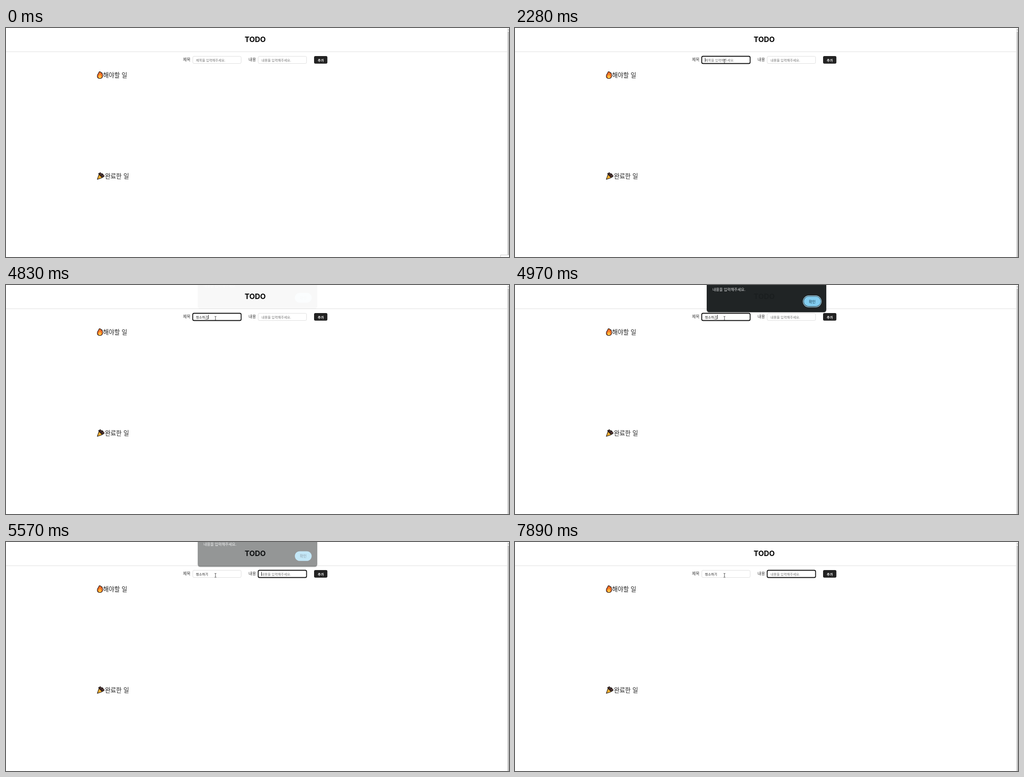
Write an HTML page that moves like this. It is 1107 px wide and 506 px high and loops after 8000 ms.

```html
<!DOCTYPE html>
<html lang="ko">
<head>
<meta charset="utf-8">
<title>TODO</title>
<style>
  html, body { margin: 0; width: 100%; height: 100%; overflow: hidden; background: #fff; }
  svg { display: block; width: 100%; height: 100%; }
  text { font-family: "Noto Sans CJK KR", "Noto Sans CJK", "Noto Sans CJK JP", sans-serif; fill: #222; white-space: pre; }
  .logo { font: 700 16px Inter, sans-serif; fill: #000; text-anchor: middle; }
  .heading { font-size: 13.4px; }
  .label { font-size: 8.9px; fill: #333; }
  .field { font-size: 7.35px; }
  .hint { fill: #757575; }
  .button { font-size: 7.35px; font-weight: 700; fill: #fff; }
  .dialog { font-size: 8.2px; fill: #e3e5e6; }
  .box { fill: #fff; stroke: #ddd; stroke-width: 1; }
  .box.focused { stroke: #0b0b0b; stroke-width: 1.8; }
</style>
</head>
<body>
<svg viewBox="0 0 1107 506">
  <text class="logo" x="548.5" y="31">TODO</text>
  <path d="M0 52.5H1103" stroke="#dedede"/>

  <text class="label" x="389.6" y="73.4">제목</text>
  <rect class="box" id="titleBox" x="411" y="62.5" width="106.5" height="16" rx="3"/>
  <text class="field hint" id="titleHint" x="418" y="73.5">제목을 입력해주세요.</text>
  <text class="field" id="titleText" x="418" y="73.5"></text>
  <path id="underline" stroke="#333" stroke-width=".8"/>

  <text class="label" x="533.8" y="73.4">내용</text>
  <rect class="box" id="bodyBox" x="555" y="62.5" width="106.5" height="16" rx="3"/>
  <text class="field hint" x="562.3" y="73.5">내용을 입력해주세요.</text>
  <path id="caret" stroke="#222" stroke-width="1"/>

  <rect x="678" y="62" width="29.3" height="16.7" rx="3" fill="#222"/>
  <text class="button" x="685.9" y="73.5">추가</text>

  <!-- flame -->
  <g stroke-linejoin="round">
    <path d="M205 96.8C207 96 209.2 97.5 209.8 99.5L211 98.8C212.6 101.5 213 104 212.7 106.5C212.2 110 210 111.6 206.8 111.6C203.2 111.6 200.9 109.4 200.9 106C200.9 103.5 202 102.4 203.1 100.8C204 99.4 204.4 98.2 205 96.8Z" fill="#f4722b" stroke="#1a1210" stroke-width="1.2"/>
    <path d="M206.4 102.5C207.8 104 210.2 105.6 210 108C209.8 110 208.5 110.9 206.7 110.9C204.7 110.9 203.3 109.7 203.3 107.9C203.3 106.2 204.4 105.9 205 104.9Z" fill="#fdb62f"/>
    <path d="M206.6 106.6Q208.4 110.4 206.6 110.6Q204.7 110.4 206.6 106.6Z" fill="#ffe37a"/>
  </g>
  <text class="heading" x="213.7" y="109">해야할 일</text>

  <!-- party popper -->
  <g stroke="#17120f" stroke-linejoin="round">
    <path d="M203.5 321.5L208 319.4L210.5 322L213 322L214 324.5L216.3 326.5L215 329L211.5 330L205 324.5Z" fill="#3b2a2b" stroke-width="1"/>
    <path d="M204.6 323.6L212 330.8L201 334.5Z" fill="#fbb733" stroke-width="1.2"/>
    <path d="M203.5 328.3L206.5 332M205 325L210 330.4" stroke="#e78a20" stroke-width=".7"/>
    <path d="M207.5 321.4l1.2 1.1M212 326.5l2.3.4" stroke="#a85c49" stroke-width="1"/>
  </g>
  <text class="heading" x="217.7" y="332">완료한 일</text>

  <rect x="1103" width="4" height="506" fill="#f1f1f1"/>
  <path d="M1104 5L1105.5 3L1107 5Z" fill="#888"/>
  <rect x="1104" y="8" width="3" height="498" fill="#c1c1c1"/>
  <rect id="corner" x="1088.5" y="501.5" width="20" height="6" fill="#fff" stroke="#c8c8c8"/>

  <g id="dialog">
    <rect x="421.5" y="-30" width="264" height="92.3" rx="6" fill="#000" opacity=".22"/>
    <rect x="422" y="-30" width="263" height="91" rx="5.5" fill="#1b1f20"/>
    <text class="dialog" x="434.7" y="14.2">내용을 입력해주세요.</text>
    <rect id="ring" x="634.2" y="25" width="39.8" height="24.6" rx="12.3" fill="none" stroke="#a6dcf5" stroke-width="1.3"/>
    <rect x="635.7" y="26.6" width="37" height="21.4" rx="10.7" fill="#80ccf0"/>
    <text x="646.4" y="40.5" font-size="8.2" style="fill:#12384a">확인</text>
  </g>

  <g id="pointer">
    <path id="arrow" d="M0 0V11L2.5 8.7L4.2 12.4L5.8 11.7L4.2 8H7.7Z" fill="#fff" stroke="#000" stroke-width=".7"/>
    <path id="beam" d="M-2 -4.3H-.6L0 -3.7L.6 -4.3H2M0 -3.7V3.7M-2 4.3H-.6L0 3.7L.6 4.3H2" fill="none" stroke="#333" stroke-width=".9"/>
  </g>
</svg>
<script>
const LOOP = 8000, STEP = 68;
const FOCUS_TITLE = 1220, FOCUS_BODY = 5510;
const $ = id => document.getElementById(id);

// time, text in the title field, length of the part still being composed
const typing = [
  [0, '', 0], [2740, 'c', 0], [3410, '', 0],
  [3680, 'ㅊ', 1], [3750, '처', 1], [3820, '청', 1],
  [4070, '청ㅅ', 1], [4140, '청소', 1],
  [4290, '청솧', 1], [4360, '청소하', 1], [4430, '청소학', 1], [4500, '청소하기', 1],
  [FOCUS_BODY, '청소하기', 0]
];

// times at which the caret turns on or off
const caretFlips = [FOCUS_TITLE, 1750, 2280, 3140, 3410, 6040, 6500, 6900, 7360, 7890];

// time, vertical offset, opacity
const dialogPoses = [
  [0, 0, 0], [4830, -9, .022], [4900, -4, .55], [4970, -1, .975], [5040, 0, 1],
  [5440, -1, .96], [FOCUS_BODY, -3, .8], [5570, -6.2, .465], [5640, -8.5, .12], [5710, 0, 0]
];

const current = (keys, t) => keys.filter(key => key[0] <= t).pop();
const show = (id, on) => $(id).setAttribute('visibility', on ? 'visible' : 'hidden');

function drawForm(t) {
  const inTitle = t >= FOCUS_TITLE && t < FOCUS_BODY;
  const inBody = t >= FOCUS_BODY;
  $('titleBox').classList.toggle('focused', inTitle);
  $('bodyBox').classList.toggle('focused', inBody);

  const [, text, composing] = current(typing, t);
  $('titleText').textContent = text;
  show('titleHint', !text);

  const width = text ? $('titleText').getComputedTextLength() : 0;
  const end = 418 + width;
  const start = end - (text ? width / text.length : 0);
  $('underline').setAttribute('d', `M${start + .5} 75.4H${end - .3}`);
  show('underline', composing);

  const caretX = inBody ? 562.5 : end + .5;
  $('caret').setAttribute('d', `M${caretX} 66V75`);
  show('caret', caretFlips.filter(flip => flip <= t).length % 2);
}

function drawDialog(t) {
  const [, y, opacity] = current(dialogPoses, t);
  $('dialog').setAttribute('transform', `translate(0 ${y})`);
  $('dialog').setAttribute('opacity', opacity);
  $('ring').setAttribute('opacity', t >= 4970 && t < FOCUS_BODY ? 1 : 0);
}

function drawPointer(t) {
  const from = 470;
  const held = from + Math.floor((t - from) / STEP) * STEP;
  const p = Math.min(1, Math.max(0, (held - from) / (1150 - from)));
  const left = (1 - p) ** 2;
  $('pointer').setAttribute('transform', `translate(${461 + 84 * left} ${73.7 - 73.7 * left})`);
  const overField = 73.7 * (1 - left) > 62;
  show('arrow', t >= from && !overField);
  show('beam', t >= from && overField);
}

function frame(now) {
  const t = now % LOOP;
  show('corner', t < 70);
  drawForm(t);
  drawDialog(t);
  drawPointer(t);
  requestAnimationFrame(frame);
}
requestAnimationFrame(frame);
</script>
</body>
</html>
```
